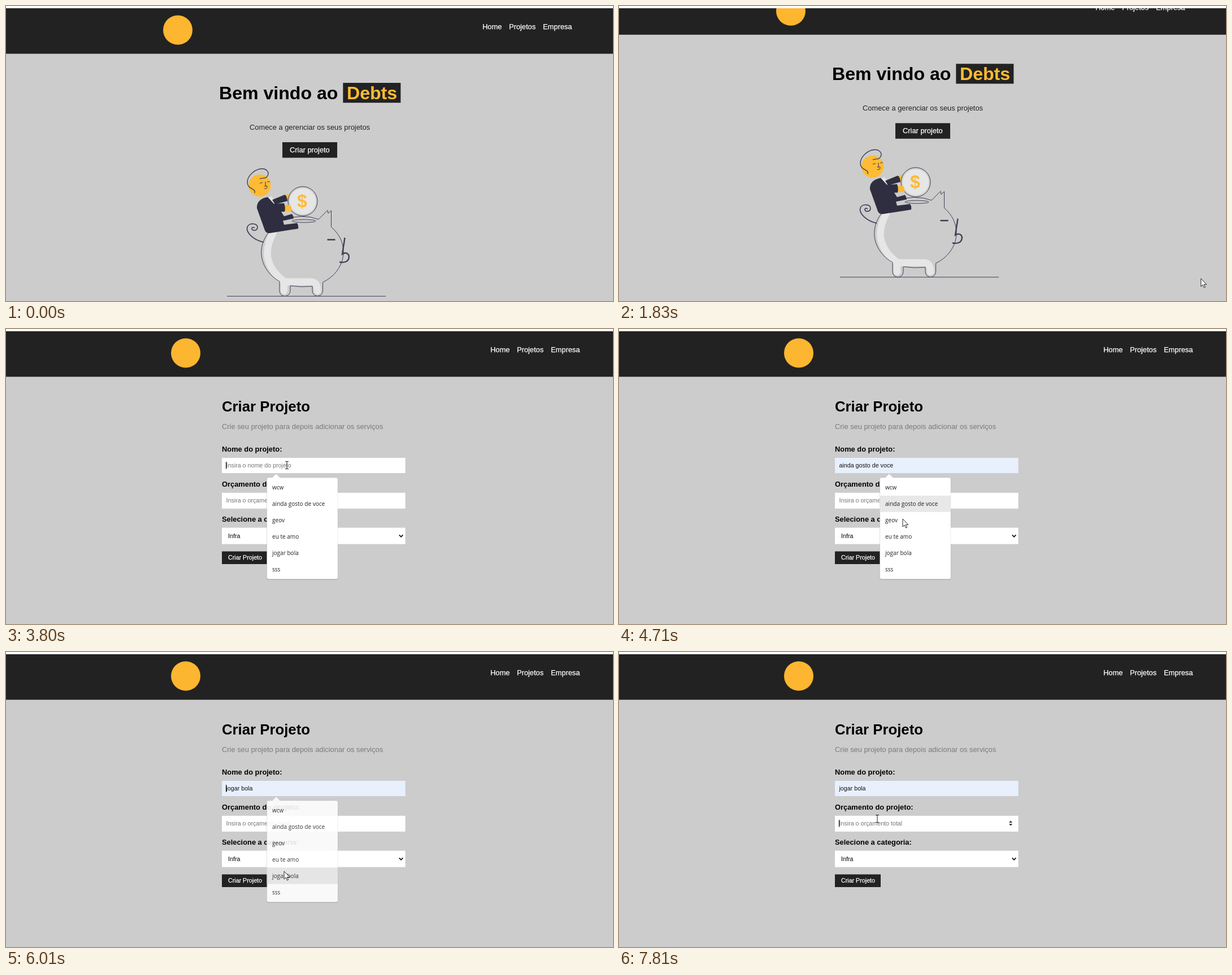
Write an HTML page that moves like this. It is 1074 px wide and 522 px high and loops after 8 s.

```html
<!DOCTYPE html>
<html lang="pt">
<head>
<meta charset="utf-8">
<title>Criar Projeto</title>
<style>
html, body { margin: 0; width: 100%; height: 100%; overflow: hidden; background: #ccc; }
svg { display: block; }
text { font-family: "Liberation Sans", Arial, sans-serif; white-space: pre; }
.ui { font-family: "Open Sans", "Noto Sans", sans-serif; }
.b { font-weight: bold; }
.white { fill: #fff; stroke: #fff; stroke-width: .25; }
.line { fill: none; stroke: #3f3d56; }
.dark { fill: #2f2e41; }
.gold { fill: #fb3; }
.pointer { fill: #fff; stroke: #111; stroke-width: .9; }
</style>
</head>
<body>
<svg id="stage" width="1074" height="522" viewBox="0 0 1074 522"></svg>
<script>
const LOOP = 8000, BASE = 12.87, SMALL = 10.7;
const text = (x, y, size, str, attrs = '') =>
  `<text x="${x}" y="${y}" font-size="${size}" ${attrs}>${str}</text>`;
const rect = (x, y, w, h, fill, attrs = '') =>
  `<rect x="${x}" y="${y}" width="${w}" height="${h}" fill="${fill}" ${attrs}/>`;
const circle = (x, y, r, attrs) => `<circle cx="${x}" cy="${y}" r="${r}" ${attrs}/>`;
const path = (d, attrs) => `<path d="${d}" ${attrs}/>`;
const line = (d, width) => path(d, `class="line" stroke-width="${width}"`);
const white = 'class="white"';

const header = dx => rect(0, 0, 1074, 84.5, '#222') + `<g transform="translate(${dx})">` +
  circle(304, 42.5, 26, 'fill="#fdb62f"') + text(843, 41, BASE, 'Home', white) +
  text(890, 41, BASE, 'Projetos', white) + text(950, 41, BASE, 'Empresa', white) + '</g>';

// The body is one ellipse, broken by the ear and the legs
const body = 'A72.5 62 0 0 1';
const pig =
  path('M473 400Q460 425 463 445Q468 470 492 487V504M492 488H540Q551 488 551 504',
    'fill="none" stroke="#e6e6e6" stroke-width="12.5" stroke-linecap="round" stroke-linejoin="round"') +
  line(`M492 378.5${body} 553 377.5L569 361.5L570 367L575.5 362V391${body} 560.5 489V504
    a9.2 9.2 0 0 1 -18.5 0V496Q522 498 503 495V504a9.5 9.5 0 0 1 -19 0V487.5${body} 466 399`, 1) +
  `<ellipse class="line" cx="527" cy="380.5" rx="21" ry="2.6"/>` +
  line('M456 418C437 414 424 400 427 391C430 383 446 384 445 392C444 399 434 398 435 393Q437 390 440 393', 1.7) +
  line('M568.5 413.5H582.5M599.5 410L595 439C603 434 609 440 606 448C603 454 595 454 590 453', 2.4) +
  line('M391 513.5H672', 1);

const man =
  circle(448.8, 317.8, 19.7, 'class="gold"') +
  line('M440 331C443 322 427 325 427 312C427 300 441 288 453 288C462 288 466 295 463 300C460 307 453 303 449 306', 1.4) +
  line('M449 313.5L454 312.5M462 311.5L467 310.5M459 311V318M457 319Q463 317 462 321Q460 324 457 323', 1.1) +
  path('M493 335L500 332V346H496Z', 'class="gold"') +
  circle(525, 345.5, 26, 'fill="#ccc" stroke="#3f3d56"') + circle(525, 345.5, 23.3, 'fill="#e6e6e6"') +
  text(524, 356, 32, '$', 'class="b gold" text-anchor="middle"') +
  path('M461 339L470 337L478 349L471 350Z', 'fill="#e6e6e6"') +
  path('M471 343L493 334Q497 335 498 345L476 351Z', 'class="dark"') +
  path('M492 352H502Q506 354 505 363H492Z', 'class="gold"') +
  path(`M444 358C443 346 452 340 463 338L474 350L492 349Q495 357 493 364H487L492 372L506 368
    Q509 372 509 376L490 380L492 387L515 384Q518 388 517 394L466 402Q460 402 458 397Z`, 'class="dark"');

const home = header(0) +
  text(377, 165, 32.1, 'Bem vindo ao', 'class="b"') + rect(596.3, 136, 102, 35.2, '#222') +
  text(603, 165, 32.1, 'Debts', 'class="b gold"') +
  text(431, 218.5, BASE, 'Comece a gerenciar os seus projetos', 'fill="#222"') +
  rect(489, 241, 97, 27.5, '#222') + text(502, 258.5, BASE, 'Criar projeto', white) + pig + man;

const fields = ['Nome do projeto:', 'Orçamento do projeto:', 'Selecione a categoria:'];
const fieldY = i => 228 + 61.8 * i;
const form = header(14) +
  text(382, 146, 25.75, 'Criar Projeto', 'class="b"') +
  text(382, 176.5, BASE, 'Crie seu projeto para depois adicionar os serviços', 'fill="#7b7b7b"') +
  fields.map((label, i) => text(382, fieldY(i) - 11, BASE, label, 'class="b"') +
    rect(382, fieldY(i), 324.5, 27 + i, '#fff', `id="field${i}"`)).join('') +
  text(389.5, 245, SMALL, '', 'id="name"') +
  text(389.5, 307, SMALL, 'Insira o orçamento total', 'fill="#757575"') +
  text(393, 370, SMALL, 'Infra', 'id="category"') +
  path('M690 302l3 -3.5l3 3.5ZM690 304l3 3.5l3 -3.5Z', 'id="spin" fill="#333"') +
  path('M695.7 364.3l3.3 3.5l3.3 -3.5', 'fill="none" stroke="#111" stroke-width="1.8"') +
  rect(382, 393.5, 81, 22.5, '#222') + text(393, 408, SMALL, 'Criar Projeto', white) +
  rect(389, 235, 1.2, 12.5, '#000', 'id="nameCaret"') + rect(389, 297, 1.2, 12.5, '#000', 'id="totalCaret"');

const options = ['wcw', 'ainda gosto de voce', 'geov', 'eu te amo', 'jogar bola', 'sss'];
const ROW = 28.9, LIST_TOP = 266;
const list = rect(461, 264, 126, 180, '#000', 'rx="3" opacity=".13"') +
  rect(461.5, 263, 125.5, 179.5, '#fff', 'rx="3" stroke="#000" stroke-opacity=".1" stroke-width=".7"') +
  path('M471 263.5l7 -7l7 7Z', 'fill="#fff"') +
  rect(461.5, 0, 125.5, ROW, '#e8e8e8', 'id="hover"') +
  options.map((o, i) => text(471, LIST_TOP + ROW * i + 18.3, 10.05, o, 'class="ui" fill="#222"')).join('');

const cursors =
  path('M0 0V14L3.2 11L5.5 16L7.6 15.1L5.3 10.3H9.8Z', 'id="arrow" class="pointer"') +
  path('M2 1Q3.5 -1 5 1V6L11 7.5Q13 7 13 9V12Q13 16 10 17H5Q3 14 0 11Q-1 8 2 10Z', 'id="hand" class="pointer"') +
  path('M-3 -6.5H3M0 -6.5V6.5M-3 6.5H3', 'id="beam" fill="none" stroke="#222"');

stage.innerHTML = rect(0, 0, 1074, 522, '#ccc') +
  `<g id="homePage">${home}</g><g id="formPage">${form}</g><g id="drop">${list}</g><g id="status">` +
  rect(-4, 514.5, 364, 20, '#dee1e6', 'rx="3" stroke="#a5a7ab"') +
  text(-4, 526, 9.5, 'localhost:3000/project', 'class="ui" fill="#555"') +
  `</g>${rect(0, 0, 1074, 4, '#fff')}<g id="cursor">${cursors}</g>`;

// Pointer moves: start, duration, end point
const moves = [
  [70, 0, 1053, 445], [270, 230, 1090, 405], [1640, 0, 1064, 505], [1640, 490, 648, 230],
  [2330, 150, 549, 223], [3320, 140, 497, 241], [4230, 220, 502, 307], [4710, 0, 502, 336],
  [4780, 410, 496, 364], [5330, 320, 492, 388], [6080, 520, 450, 294], [6880, 0, 457, 295]
];
const clamp = v => Math.min(1, Math.max(0, v));
const easeIn = u => u ** 2.65;

function pointer(t) {
  let x = 1090, y = 445;
  for (const [start, span, toX, toY] of moves) {
    if (t < start) break;
    const k = span ? easeIn(clamp((t - start) / span)) : 1;
    x += (toX - x) * k;
    y += (toY - y) * k;
  }
  return [x, y];
}

const $ = id => document.getElementById(id);
const show = (id, on) => $(id).setAttribute('visibility', on ? 'inherit' : 'hidden');
const set = (id, key, value) => $(id).setAttribute(key, value);

function draw(t) {
  const within = (a, b = LOOP) => t >= a && t < b;
  const onForm = t >= 2800;
  $('homePage').style.display = onForm ? 'none' : '';
  $('formPage').style.display = onForm ? '' : 'none';
  set('homePage', 'transform', `translate(0 ${t < 1160 ? 0 : t < 1230 ? -8.7 : -33.7})`);
  show('status', within(2480, 3320));

  // The highlighted row trails the pointer slightly and stays put after the click
  const hoverY = pointer(Math.min(t, 5870) - 70)[1];
  const row = t < 3800 ? -1 : Math.floor((hoverY - LIST_TOP) / ROW);
  const picked = row >= 0;
  $('name').textContent = picked ? options[row] : 'Insira o nome do projeto';
  set('name', 'fill', picked ? '#111' : '#757575');
  set('field0', 'fill', picked ? '#e8f0fe' : '#fff');
  show('hover', picked);
  set('hover', 'y', LIST_TOP + ROW * row);
  set('drop', 'opacity', clamp((t - 3660) / 140) * clamp(1 - (t - 5985) / 250));

  show('category', t >= 3100);
  show('spin', t >= 6500);
  show('nameCaret', within(3660, 4230) || within(5870, 6400));
  show('totalCaret', within(6730, 7280) || within(7810));

  const beam = within(3390, 4230) || t >= 6500, hand = within(2480, 2880);
  set('cursor', 'transform', `translate(${pointer(t)})`);
  show('beam', beam);
  show('hand', hand);
  show('arrow', !beam && !hand);
}

const start = performance.now();
(function tick() {
  draw((performance.now() - start) % LOOP);
  requestAnimationFrame(tick);
})();
</script>
</body>
</html>
```
